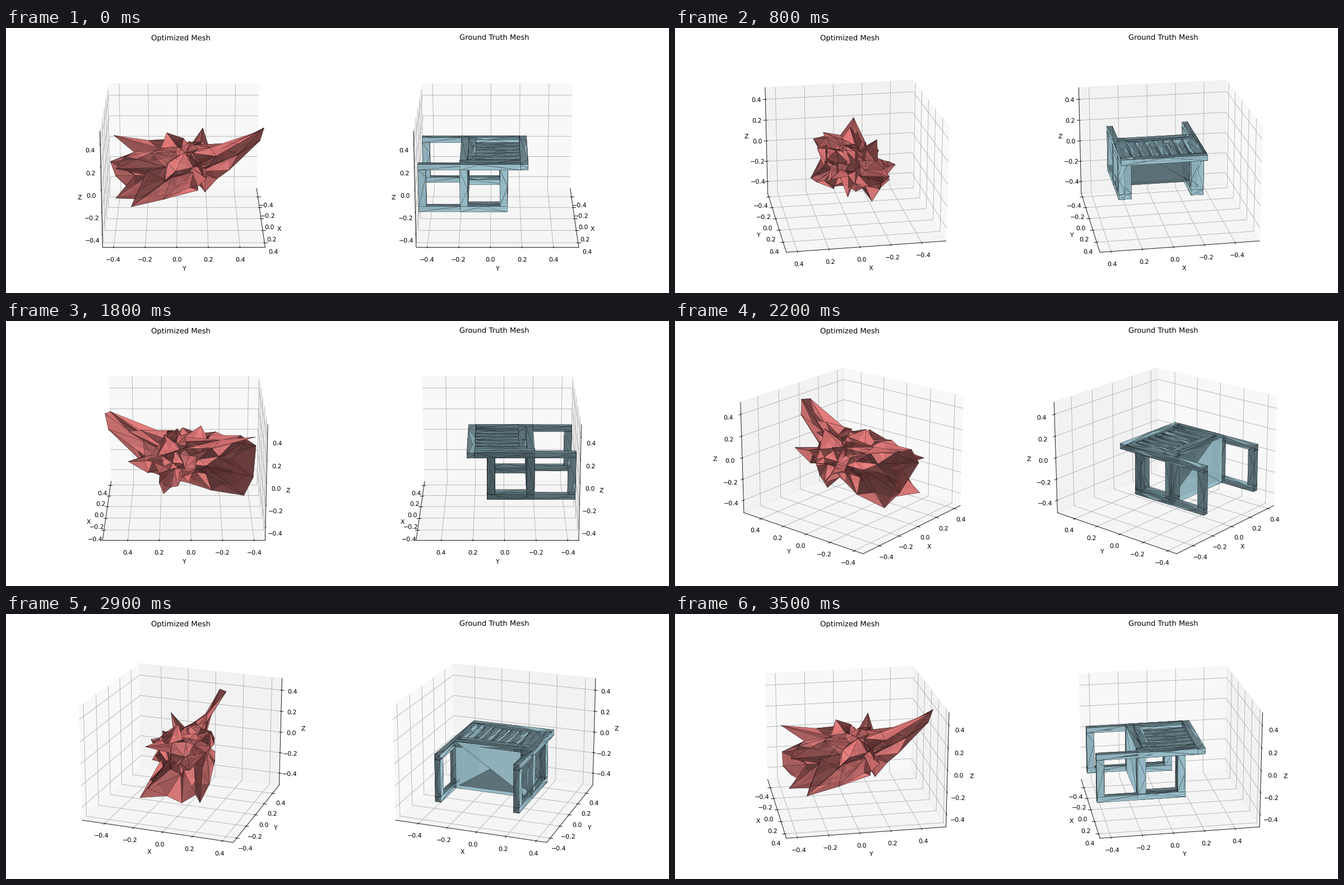
Write a matplotlib script that moves like this. It is 1183 by 473 pixels and loops after 3600 ms.

```python
import numpy as np
import matplotlib.pyplot as plt
from matplotlib.animation import FuncAnimation
from matplotlib.colors import to_rgb
from mpl_toolkits.mplot3d.art3d import Poly3DCollection

WIDTH, HEIGHT, DPI = 1183, 473, 78.87
SIDE, BOTTOM = 432.5, 461.2
FRAMES, INTERVAL = 36, 100
CENTER, REACH = np.array([-0.045, 0.045, -0.004]), 0.515
LIGHT = np.array([-2, -2, 1]) / 3
rng = np.random.default_rng(11)
plt.rcParams['text.hinting'] = 'none'


def shade(color, normals):
    level = 0.65 + 0.35 * np.asarray(normals) @ LIGHT
    return np.outer(level, to_rgb(color))


def icosahedron():
    golden = (1 + 5 ** 0.5) / 2
    verts = np.array([np.roll((s, t * golden, 0), k)
                      for k in range(3) for s in (-1, 1) for t in (-1, 1)])
    verts /= np.linalg.norm(verts[0])
    near = lambda i, j: np.linalg.norm(verts[i] - verts[j]) < 1.1
    faces = [(i, j, k) for i in range(12) for j in range(i) for k in range(j)
             if near(i, j) and near(j, k) and near(i, k)]
    return verts, faces


def subdivide(verts, faces):
    verts, middles, finer = list(verts), {}, []

    def middle(i, j):
        key = min(i, j), max(i, j)
        if key not in middles:
            middles[key] = len(verts)
            verts.append((verts[i] + verts[j]) / 2)
        return middles[key]

    for i, j, k in faces:
        a, b, c = middle(i, j), middle(j, k), middle(k, i)
        finer += [(i, a, c), (j, b, a), (k, c, b), (a, b, c)]
    return np.array(verts), finer


def spiky_mesh():
    """A rough ball pulled out to a few long tips, then crumpled."""
    tips = np.array([(.15, .52, .30), (.05, .53, .19), (-.2, .37, .02),
                     (-.12, .11, -.27), (.17, -.56, -.23), (-.18, -.5, -.26),
                     (.1, -.6, .04), (.23, -.55, .03), (-.1, -.58, .18),
                     (.27, -.44, -.26)])
    axes = np.array([.29, .30, .25])
    dirs, faces = subdivide(*icosahedron())
    dirs /= np.linalg.norm(dirs, axis=1, keepdims=True)
    points = dirs * axes * rng.uniform(0.55, 1.15, (len(dirs), 1))
    free = np.ones(len(dirs), bool)
    for tip in tips:
        best = np.where(free, dirs @ (tip / axes), -np.inf).argmax()
        points[best], free[best] = tip, False
    coarse = len(points)
    points, faces = subdivide(points, faces)
    points[coarse:] *= rng.uniform(0.55, 1.1, (len(points) - coarse, 1))
    points[coarse:] += rng.normal(0, 0.035, (len(points) - coarse, 3))

    tris = (points + (0, 0.045, 0))[faces] * (0.865, 0.865, 1.153) + CENTER
    normals = np.cross(tris[:, 1] - tris[:, 0], tris[:, 2] - tris[:, 0])
    normals /= np.linalg.norm(normals, axis=1, keepdims=True)
    normals *= rng.choice([-1, 1], (len(tris), 1))
    return tris, shade('lightcoral', normals)


def box(x0, x1, y0, y1, z0, z1, panel=False):
    """Triangles and shading normals; a panel's faces have one diagonal each."""
    lo, hi = np.array([x0, y0, z0]), np.array([x1, y1, z1])
    tris, normals = [], []
    for axis in range(3):
        u, v = sorted({0, 1, 2} - {axis}, key=lambda k: lo[k] - hi[k])
        for side in (0, 1):
            def corner(s, t):
                p = np.empty(3)
                p[axis] = (lo, hi)[side][axis]
                p[u] = lo[u] + s * (hi[u] - lo[u])
                p[v] = lo[v] + t * (hi[v] - lo[v])
                return p
            a, b, c, d = corner(0, 0), corner(1, 0), corner(1, 1), corner(0, 1)
            m = corner(rng.uniform(0.1, 0.9), side)
            if panel:
                new = [(a, b, c), (a, c, d)] if side else [(a, b, d), (b, c, d)]
            elif side:
                new = [(a, b, m), (b, c, m), (d, a, m)]
            else:
                new = [(d, a, m), (m, c, d), (m, b, c)]
            outward = 1 if panel and axis == 1 else -1
            tris += new
            normals += [np.eye(3)[axis] * (2 * side - 1) * outward] * len(new)
    return tris, normals


def chair_mesh():
    thick, half = 0.049, 0.283
    slim, wide = half - 0.038, half - 0.083
    back, board, leg, front = -0.46, -0.195, 0.11, 0.241
    foot, top = -0.299, 0.131
    low, under = foot + thick, top - thick
    parts = [box(-slim, slim, board, board + thick, foot, top, panel=True),
             box(-half, half, front - thick, front, under, top),
             box(-slim, slim, board + thick, board + 2 * thick, under, top)]
    for side in (-1, 1):
        def beam(inner, *yz):
            return box(*sorted((side * inner, side * half)), *yz)

        for inner, start in [(slim, back), (wide, board)]:
            parts += [beam(inner, start, leg, foot, low),
                      beam(inner, start, front - thick, under, top),
                      beam(inner, start, start + thick, low, under),
                      beam(inner, leg - thick, leg, low, under)]
    for x in np.linspace(-.16, .16, 6):
        parts.append(box(x - .022, x + .022, board + thick, front - thick,
                         under, top - thick / 3))
    tris = np.array([t for part in parts for t in part[0]])
    normals = np.array([n for part in parts for n in part[1]])
    return tris, shade('lightblue', normals)


fig = plt.figure(figsize=(WIDTH / DPI, HEIGHT / DPI), dpi=DPI)
views = []
for title, middle, (tris, colors) in [('Optimized Mesh', 311.5, spiky_mesh()),
                                      ('Ground Truth Mesh', 871, chair_mesh())]:
    ax = fig.add_axes([(middle - SIDE / 2) / WIDTH, 1 - BOTTOM / HEIGHT,
                       SIDE / WIDTH, SIDE / HEIGHT], projection='3d')
    ax.add_collection3d(Poly3DCollection(tris, facecolors=colors, alpha=0.8,
                                         edgecolors='black', linewidths=0.2))
    ax.set(title=title, xlabel='X', ylabel='Y', zlabel='Z')
    for set_lim, c in zip((ax.set_xlim, ax.set_ylim, ax.set_zlim), CENTER):
        set_lim(c - REACH, c + REACH)
    views.append(ax)


def update(frame):
    for ax in views:
        ax.view_init(elev=20, azim=frame * 360 / FRAMES)
    return views


anim = FuncAnimation(fig, update, frames=FRAMES, interval=INTERVAL,
                     repeat=True, blit=False)
plt.show()
```
